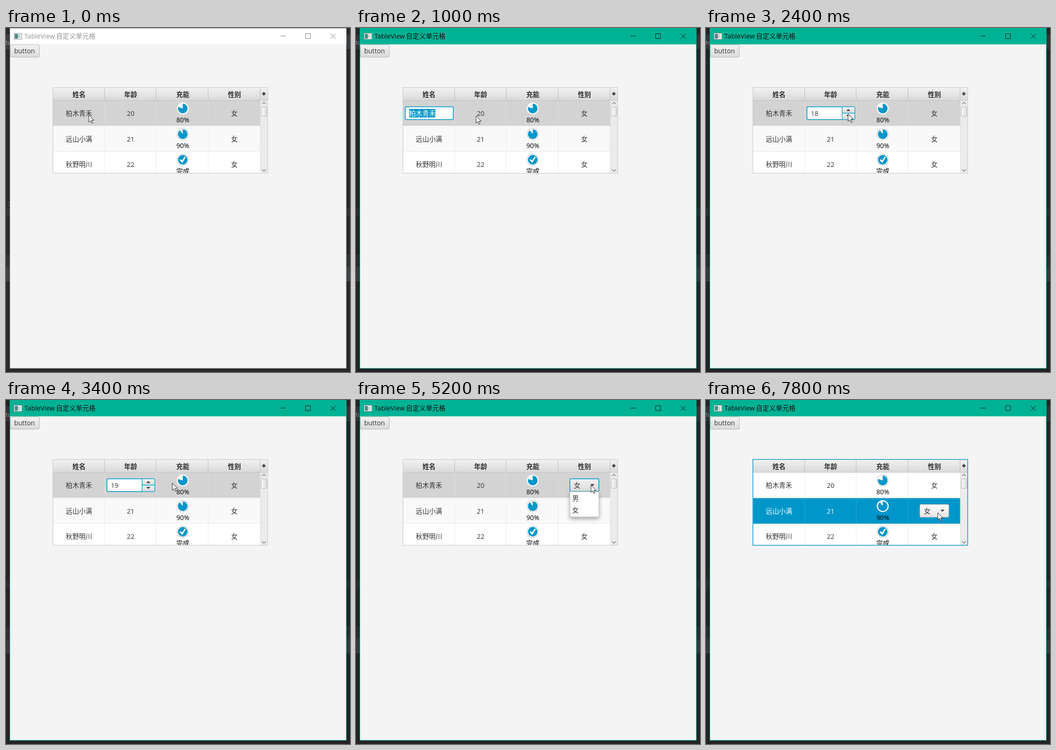
An HTML page that plays this animation: 748 px wide and 748 px high, repeating every 8000 ms.

```html
<!DOCTYPE html>
<html lang="zh">
<head>
<meta charset="utf-8">
<title>TableView</title>
<style>
html, body { margin: 0; width: 100%; height: 100%; overflow: hidden; background: #2b2b2b; }
svg { display: block; width: 100vw; height: 100vh; }
text { font: 14.3px 'Open Sans', 'Noto Sans CJK SC', 'Noto Sans CJK', sans-serif; white-space: pre; }
</style>
</head>
<body>
<svg viewBox="0 0 748 748">
  <defs>
    <linearGradient id="head" x2="0" y2="1"><stop stop-color="#f2f2f2"/><stop offset="1" stop-color="#d9d9d9"/></linearGradient>
    <linearGradient id="face" x2="0" y2="1"><stop stop-color="#f3f3f3"/><stop offset="1" stop-color="#dadada"/></linearGradient>
    <linearGradient id="light" x2="0" y2="1"><stop stop-color="#fefefe"/><stop offset="1" stop-color="#e4e4e4"/></linearGradient>
    <linearGradient id="thumb"><stop stop-color="#fafafa"/><stop offset="1" stop-color="#dedede"/></linearGradient>
    <filter id="shadow" x="-30%" y="-30%" width="160%" height="170%"><feDropShadow dx="0" dy="4" stdDeviation="4" flood-opacity=".35"/></filter>
    <clipPath id="body"><rect x="102" y="129" width="467" height="186.5"/></clipPath>
  </defs>
  <g id="scene"></g>
  <path id="cursor" d="M0 0V16L3.8 12.4L6.3 18.4L8.8 17.3L6.3 11.5H11.3Z" fill="#fff" stroke="#1c1c28" stroke-width="1"/>
</svg>
<script>
const LOOP = 8000, STEP = 200;
const BLUE = '#0096c9', TEAL = '#00b294', INK = '#333';
const scene = document.getElementById('scene');
const cursor = document.getElementById('cursor');

const people = [
  { name: '柏木青禾', age: 20, charge: 0.8 },
  { name: '远山小满', age: 21, charge: 0.9 },
  { name: '秋野明川', age: 22, charge: 1 }
];
const centers = [158.7, 271, 384.5, 496.7];
const dividers = [214.5, 326.5, 439.5];
const rowTops = [157.5, 213.3, 269];

// time, x, y
const moves = [
  [0, 180, 189], [600, 180, 189], [800, 222, 191], [1000, 261, 191], [1400, 271, 188], [1600, 271, 188],
  [2000, 309, 187], [2600, 309, 187], [2800, 311, 175], [3200, 311, 175], [3600, 412, 186],
  [4000, 503, 186], [4200, 506, 185], [4800, 511, 185], [5200, 511, 185], [5600, 496, 235],
  [6000, 496, 236], [6400, 496, 240], [7200, 496, 240], [7800, 504, 245]
];

// Each entry adds to the state before it.
const changes = [
  [0, { active: false, row: 0, focus: false, edit: '', open: false, hover: -1 }],
  [200, { active: true, focus: true }],
  [600, { focus: false, edit: 'name' }],
  [1400, { focus: true, edit: '' }],
  [1600, { edit: 'age', value: 20 }],
  [2000, { focus: false, value: 19 }],
  [2200, { value: 18 }],
  [3000, { value: 19 }],
  [4000, { focus: true }],
  [4400, { edit: 'gender' }],
  [5200, { focus: false, open: true }],
  [5400, { hover: 0 }],
  [5600, { hover: 1 }],
  [6000, { open: false }],
  [6400, { focus: true, edit: '', row: 1 }],
  [7200, { edit: 'gender' }]
];

const stateAt = t => Object.assign({}, ...changes.filter(c => c[0] <= t).map(c => c[1]));

function cursorAt(t) {
  const i = moves.findIndex(m => m[0] > t);
  if (i < 0) return moves.at(-1).slice(1);
  const [a, b] = [moves[i - 1], moves[i]];
  const k = (t - a[0]) / (b[0] - a[0]);
  return [a[1] + (b[1] - a[1]) * k, a[2] + (b[2] - a[2]) * k];
}

const rect = (x, y, w, h, fill, more = '') =>
  `<rect x="${x}" y="${y}" width="${w}" height="${h}" fill="${fill}" ${more}/>`;
const path = (d, fill, more = '') => `<path d="${d}" fill="${fill}" ${more}/>`;
const line = (d, color, width = 1) => path(d, 'none', `stroke="${color}" stroke-width="${width}"`);
const text = (x, y, s, fill = INK, more = '') => `<text x="${x}" y="${y}" fill="${fill}" ${more}>${s}</text>`;
const mid = (x, y, s, fill, more = '') => text(x, y, s, fill, 'text-anchor="middle" ' + more);
const box = (x, y, w, h, fill, focused) =>
  rect(x, y, w, h, fill, `rx="2.5" stroke="${focused ? '#119fd0' : '#b5b5b5'}" stroke-width="${focused ? 1.8 : 1}"`);
const arrow = (x, y, dir) => path(`M${x - 4.5} ${y - 2 * dir}h9l-4.5 ${4.5 * dir}z`, '#444');

function backdrop(active) {
  const bands = [[14, 32, '#3a3d3f'], [393, 16, '#323436'], [493, 27, '#323537'], [520, 31, '#3e4345']];
  return rect(0, 0, 748, 748, '#29292a')
    + bands.map(([y, h, c]) => rect(0, y, 748, h, c)).join('')
    + text(-1, 36, 'tu', '#a9b0b5', 'style="font-size:13px"')
    + text(3.5, 386, ';', active ? '#55633f' : '#c07a35', 'style="font-size:13px"')
    + (active ? rect(0, 0, 748, 748, '#000', 'opacity=".15"') : '');
}

function windowFrame(active) {
  const ink = active ? '#111' : '#949494', mark = active ? '#111' : '#777';
  return rect(8.5, 0.5, 731.5, 739.5, '#f4f4f4', `stroke="${active ? TEAL : '#8a8a8a'}"`)
    + rect(9, active ? 0 : 1, 731, active ? 35.5 : 34.5, active ? TEAL : '#fff')
    + rect(17.5, 11.5, 17, 13, '#f6f6f6', 'stroke="#8d9a9c"')
    + rect(19, 13, 7, 10, '#4b8c8a') + rect(27.5, 14, 2, 8, '#9fb4b4') + rect(31, 13, 2, 10, '#d5dcdc')
    + text(40, 23, 'TableView', ink) + text(108.8, 23, '自定义单元格', ink)
    + line('M597 17.5h11M651.5 12.5h10.5v10.5h-10.5zM706 12.5l11 11M717 12.5l-11 11', mark)
    + rect(9.5, 36.5, 63, 27, 'url(#face)', 'rx="2.5" stroke="#b5b5b5"')
    + text(17.8, 55, 'button');
}

function gauge(x, y, part, selected) {
  const r = 10.4, a = part * 2 * Math.PI;
  let s = `<circle cx="${x}" cy="${y}" r="12.4" fill="#fff" stroke="${selected ? '#f4f4f4' : '#c9c9c9'}" stroke-width="1.2"/>`;
  if (part < 1) {
    return s + path(`M${x} ${y}v${-r}A${r} ${r} 0 1 1 ${x + r * Math.sin(a)} ${y - r * Math.cos(a)}z`, BLUE);
  }
  return s + `<circle cx="${x}" cy="${y}" r="${r}" fill="${BLUE}"/>`
    + path(`M${x - 6.8} ${y + 0.8}l2.4-2.3 2.7 3.4 6-9 2.5 1.4-7.8 12.6z`, '#fff');
}

const nameField = y =>
  box(107, y + 13.8, 104.5, 27.8, '#fff', true)
  + rect(116, y + 18.5, 56.5, 18.5, BLUE) + text(115.8, y + 33.2, people[0].name, '#fff');

function spinner(y, value, focused) {
  const edge = focused ? '#119fd0' : '#b5b5b5';
  return box(219.5, y + 13.8, 104, 27.8, '#fff', focused)
    + rect(296, y + 14.5, 26.8, 13, 'url(#face)') + rect(296, y + 28, 26.8, 13, 'url(#face)')
    + line(`M296 ${y + 14}v27.5M296 ${y + 27.8}h27`, edge, focused ? 1.4 : 1)
    + arrow(309.5, y + 21, -1) + arrow(309.5, y + 33.5, 1)
    + text(228, y + 33.2, value);
}

const combo = (y, focused) =>
  box(465, y + 13.8, 63, 27.8, focused ? 'url(#face)' : 'url(#light)', focused)
  + text(474, y + 33.2, '女') + arrow(514.2, y + 27.3, 1);

const popup = (y, hover) =>
  rect(465.5, y + 42, 62.5, 54.5, '#fff', 'stroke="#c4c4c4" filter="url(#shadow)"')
  + (hover < 0 ? '' : rect(466, y + 42.5 + hover * 27, 61.5, 27, BLUE))
  + ['男', '女'].map((s, i) => text(470, y + 61 + i * 26.5, s, hover === i ? '#fff' : INK)).join('');

function tableRow(p, i, st) {
  const y = rowTops[i], here = st.row === i, lit = here && st.focus;
  const fill = lit ? BLUE : here ? '#d3d3d3' : i === 1 ? '#f9f9f9' : '#fff';
  const ink = lit ? '#fff' : INK, edit = here ? st.edit : '';
  let s = rect(102, y, 451, 55.8, fill);
  s += line(`M102 ${y + 55.3}h451`, lit ? BLUE : '#e8e8e8');
  s += line(dividers.map(x => `M${x} ${y}v55`).join(''), lit ? '#2ba7d2' : here ? '#dedede' : '#ececec');
  if (lit) s += rect(103.5, y + 1.5, 448.5, 53, 'none', 'stroke="#1fa3d0" stroke-width=".8"');
  s += edit === 'name' ? nameField(y) : mid(centers[0], y + 33.2, p.name, ink);
  s += edit === 'age' ? spinner(y, st.value, !st.focus) : mid(centers[1], y + 33.2, p.age, ink);
  s += gauge(384.3, y + 17.5, p.charge, here);
  s += mid(centers[2], y + 47.5, p.charge < 1 ? p.charge * 100 + '%' : '完成', '#000');
  s += edit === 'gender' ? combo(y, !st.focus) : mid(centers[3], y + 33.2, '女', ink);
  return s;
}

function table(st) {
  const header = rect(102, 129, 467, 28.5, 'url(#head)')
    + line('M102 157.3h467', '#c2c2c2')
    + line([...dividers, 552.5].map(x => `M${x} 130v27`).join(''), '#bdbdbd')
    + ['姓名', '年龄', '充能', '性别'].map((s, i) => mid(centers[i], 149.8, s, '#2e2e2e', 'font-weight="700" style="font-weight:700"')).join('')
    + line('M557 143h7.4M560.7 139.3v7.4', '#444', 2.8);
  const bar = rect(553, 158, 16, 158, '#ebebeb') + line('M553 158v158', '#dcdcdc')
    + rect(555, 171.5, 12, 20.5, 'url(#thumb)', 'rx="2" stroke="#b4b4b4"')
    + line('M556.7 165.3l4.2-4 4.2 4M556.7 307.5l4.2 4 4.2-4', '#666', 1.1);
  return `<g clip-path="url(#body)">${rect(102, 129, 467, 187, '#fff')}`
    + people.map((p, i) => tableRow(p, i, st)).join('') + header + bar + '</g>'
    + rect(102, 129.3, 467, 186.5, 'none', `stroke="${st.focus ? '#1a9fcd' : '#c4c4c4'}" stroke-width="${st.focus ? 1.6 : 1}"`)
    + (st.open ? popup(rowTops[st.row], st.hover) : '');
}

let shown = -1;
function draw(now) {
  const t = Math.floor(now % LOOP / STEP) * STEP;
  if (t !== shown) {
    const st = stateAt(t);
    scene.innerHTML = backdrop(st.active) + windowFrame(st.active) + table(st);
    cursor.setAttribute('transform', `translate(${cursorAt(t)})`);
    shown = t;
  }
}

const start = performance.now();
function tick() {
  draw(performance.now() - start);
  requestAnimationFrame(tick);
}
tick();
</script>
</body>
</html>
```
